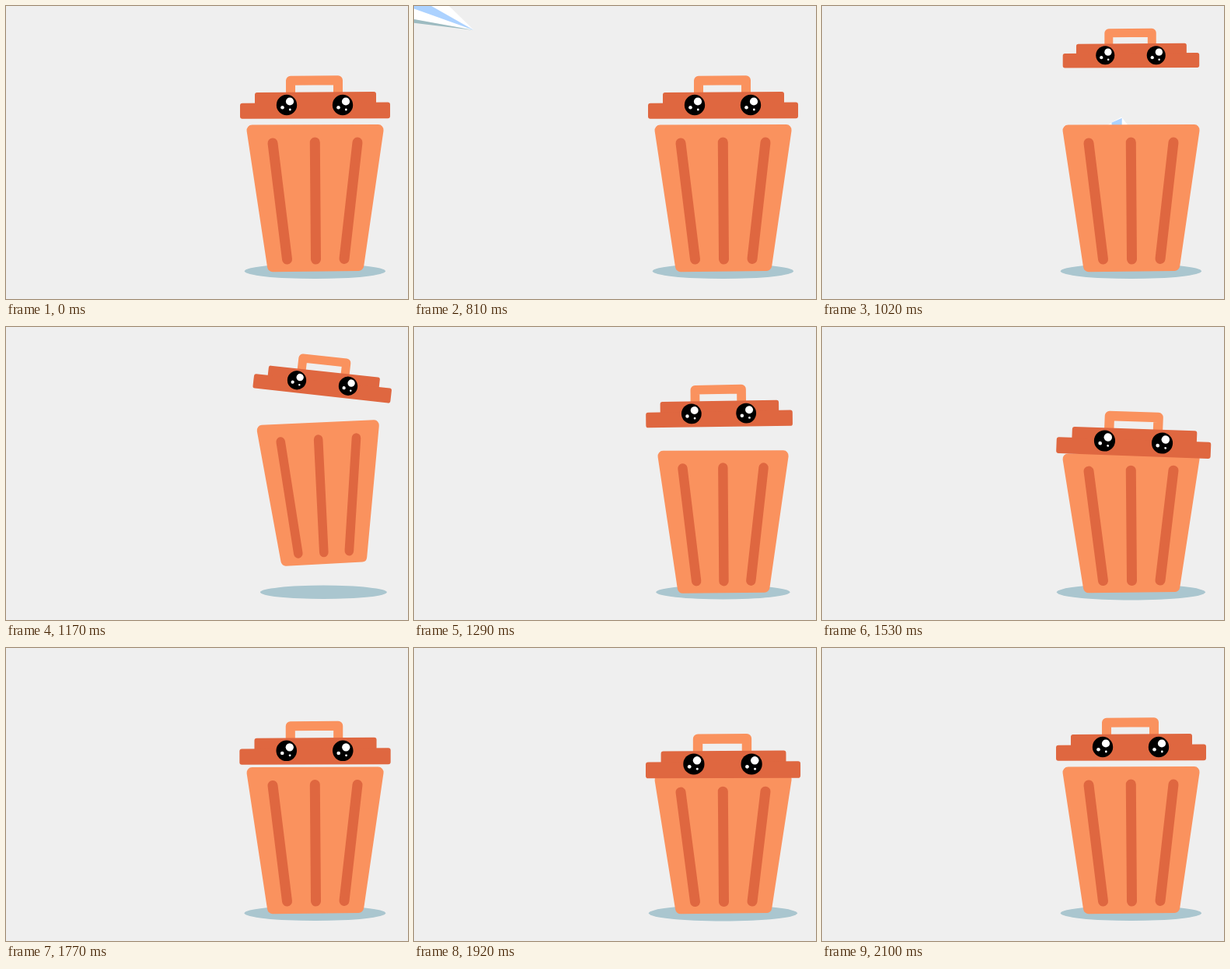
An HTML page with a canvas that plays this animation: 517 px wide and 376 px high, repeating every 2.7 s.

```html
<!DOCTYPE html>
<html lang="en">
<head>
<meta charset="utf-8">
<title>Paper plane and bin</title>
<style>
html, body { margin: 0; width: 100%; height: 100%; overflow: hidden; background: #efefef; }
canvas { display: block; }
</style>
</head>
<body>
<canvas id="stage" width="517" height="376"></canvas>
<script>
const ctx = document.getElementById('stage').getContext('2d');
const LOOP = 2700, STEP = 30, ENTER = 810, FLIGHT = 240;
const LIGHT = '#fa925e', DARK = '#df6740', SHADE = '#aac6cf', BACK = '#efefef';

// Half a sine wave over the given span, zero elsewhere
function bump(t, begin, span) {
  const u = (t - begin) / span;
  return u > 0 && u < 1 ? Math.sin(Math.PI * u) : 0;
}

function poly(color, pts, r = 0) {
  const n = pts.length, end = pts[n - 1];
  ctx.beginPath();
  ctx.moveTo((end[0] + pts[0][0]) / 2, (end[1] + pts[0][1]) / 2);
  pts.forEach((p, i) => ctx.arcTo(...p, ...pts[(i + 1) % n], r));
  ctx.closePath();
  ctx.fillStyle = color;
  ctx.fill();
}

function oval(color, x, y, rx, ry = rx) {
  ctx.beginPath();
  ctx.ellipse(x, y, rx, ry, 0, 0, Math.PI * 2);
  ctx.fillStyle = color;
  ctx.fill();
}

function line(color, width, ...pts) {
  ctx.beginPath();
  pts.forEach(p => ctx.lineTo(...p));
  ctx.strokeStyle = color;
  ctx.lineWidth = width;
  ctx.stroke();
}

function placed(x, y, angle, sx, sy, draw) {
  ctx.save();
  ctx.translate(x, y);
  ctx.rotate(angle);
  ctx.scale(sx, sy);
  draw();
  ctx.restore();
}

const rad = deg => deg * Math.PI / 180;

function plane() {
  poly('#ffffff', [[0, 0], [-68, -66], [-106, -59], [-106, -37], [-105, -19]]);
  poly('#acd2ff', [[0, 0], [-104, -59], [-106, -38]]);
  poly('#9dbbc1', [[0, 0], [-105, -19], [-96, -11.5]]);
}

// Curved dive from the corner into the bin
function fly(t) {
  const u = (t - ENTER) / FLIGHT, v = 1 - u;
  if (u < 0 || u > 1) return;
  const [x0, y0] = [77, 31], [x1, y1] = [360, 72], [x2, y2] = [398, 275];
  const x = v * v * x0 + 2 * u * v * x1 + u * u * x2;
  const y = v * v * y0 + 2 * u * v * y1 + u * u * y2;
  const heading = Math.atan2(v * (y1 - y0) + u * (y2 - y1), v * (x1 - x0) + u * (x2 - x1));
  const size = 1 - 0.35 * u;
  placed(x, y, heading - Math.atan2(y1 - y0, x1 - x0), size, size, plane);
}

function bin() {
  poly(LIGHT, [[-89.6, -188.4], [88.7, -189], [61.3, -1], [-61, 0.3]], 7);
  line(DARK, 13, [-55, -165], [-36.5, -16]);
  line(DARK, 13, [-0.7, -166], [0.5, -16]);
  line(DARK, 13, [54, -166], [37, -16.5]);
}

function eye(x) {
  oval('#000000', x, 0, 13.2);
  oval('#ffffff', x + 4, -4.5, 5.1);
  oval('#ffffff', x - 5.5, 3.2, 2.3);
  oval('#ffffff', x + 4.3, 6, 1.4);
}

function lid() {
  line(LIGHT, 12, [-31, -12], [-31, -31.3], [30, -31.8], [30, -12]);
  poly(DARK, [[-77, -16], [79, -17], [79, 4], [-77, 4]], 3);
  poly(DARK, [[-96, -2.3], [97, -3.6], [97, 17.2], [-96, 17.8]], 3);
  eye(-36);
  eye(36);
}

function draw(t) {
  const open = bump(t, ENTER, 520);
  const hop = bump(t, 1050, 240);
  const land = bump(t, 1230, 120);
  const rebound = bump(t, 1290, 180);
  const slam = bump(t, 1470, 120);
  const lift = bump(t, 1590, 155);
  const settle = bump(t, 1745, 355);
  const squash = slam + settle ** 2;

  ctx.fillStyle = BACK;
  ctx.fillRect(0, 0, 517, 376);
  const shade = 90.5 - 9 * hop - 4.5 * land + 5 * squash;
  oval(SHADE, 397.4 + 11 * hop, 340.3, shade, shade * 0.107);
  fly(t);

  const wide = 1 - 0.107 * hop - 0.045 * land;
  const tall = 1 - 0.035 * hop - 0.03 * land - 0.053 * squash;
  placed(398 + 11 * hop, 341 - 36.5 * hop + 0.6 * land, rad(-2.4 * hop), wide, tall, bin);

  const drop = 20.5 * slam + 22 * settle - 66.8 * open - 32 * rebound - 10 * lift;
  const size = 1 + 0.00142 * drop;
  const tilt = 6.5 * hop - 0.6 * land + 2.3 * slam;
  placed(397 + 10 * hop - 5 * land + 3.5 * slam, 127 + drop, rad(tilt), size, size, lid);
}

ctx.lineCap = ctx.lineJoin = 'round';
const start = performance.now();

function tick() {
  const t = (performance.now() - start) % LOOP;
  draw(Math.floor(t / STEP) * STEP);
  requestAnimationFrame(tick);
}
tick();
</script>
</body>
</html>
```
